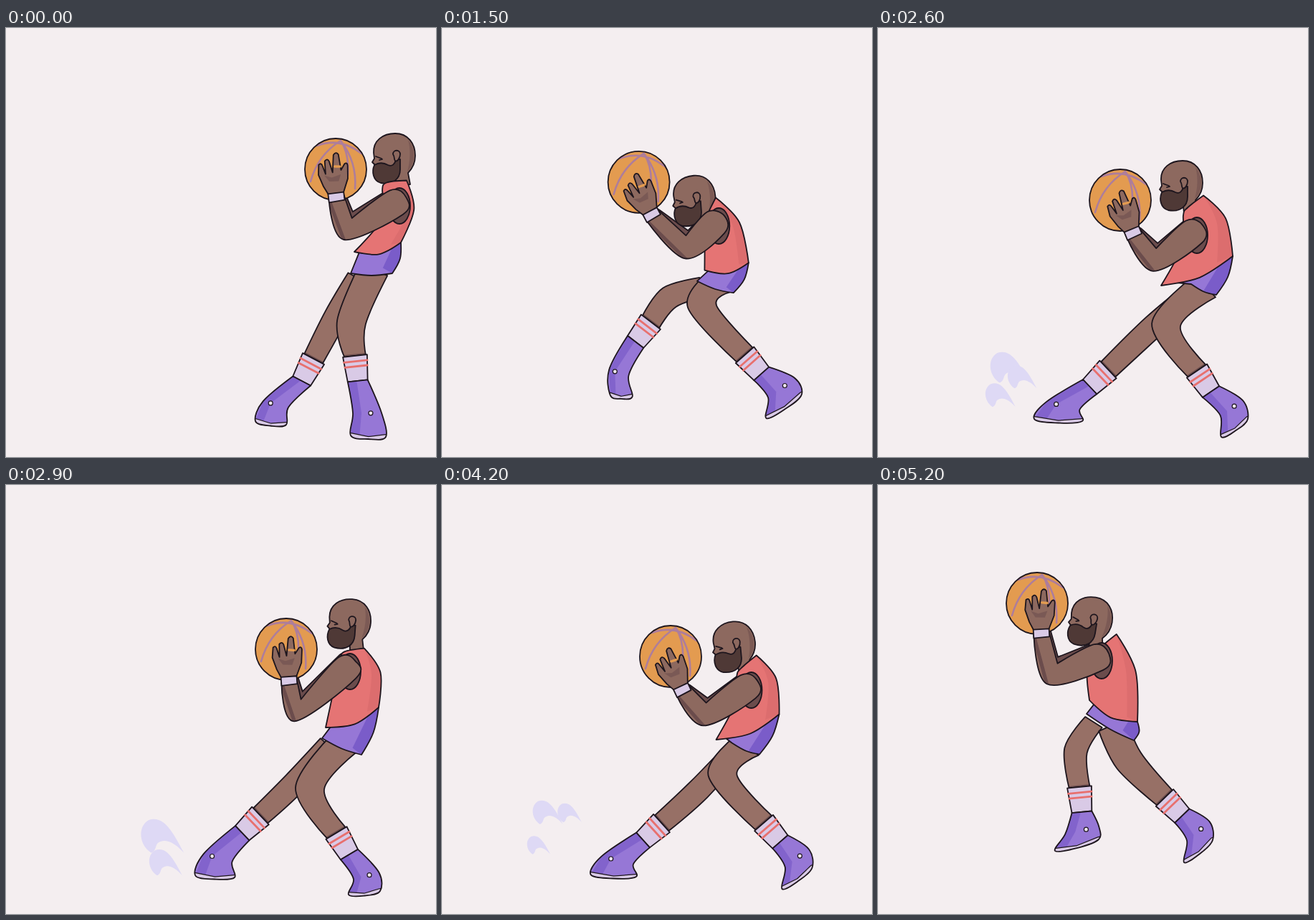
Animation of 600 by 598 pixels, one loop 5500 ms. Source, as an HTML page:

```html
<!DOCTYPE html>
<html lang="en">
<head>
<meta charset="utf-8">
<title>Basketball step-back</title>
<style>
html, body { margin: 0; width: 100%; height: 100%; overflow: hidden; background: #f4eef0; }
svg { display: block; width: 100vw; height: 100vh; }
.ink { stroke: #1d151d; stroke-width: 1.8; stroke-linejoin: round; stroke-linecap: round; }
.line { fill: none; stroke-linejoin: round; stroke-linecap: round; }
</style>
</head>
<body>
<svg id="stage" viewBox="0 0 600 598"></svg>
<script>
const stage = document.getElementById('stage');

const color = {
  ink: '#1d151d', skin: '#8d695f', leg: '#977066', shade: '#6b4c4c', beard: '#4f3936',
  shirt: '#e57474', shirtDark: '#d5686a', purple: '#9677d6', purpleDark: '#7657c7',
  sock: '#d9cae6', stripe: '#e8706e', ball: '#e39b50', seam: '#ad7d9c', dust: '#ded9f5'
};

// Joints of the key poses along the step-back
// head: x y tilt; arm: shoulder elbow wrist; body: neck, back and front hem, seat, thigh
// far, near: knee, ankle, left and right end of the sole
const poses = [
  { u: 0, ball: '460 197', head: '541 178 0', arm: '545 243 477 280 461 236',
    body: '545 214 551 299 486 312 539 342 481 342',
    far: '460 402 429 461 348 548 391 553', near: '482 410 487 457 481 568 530 570' },
  { u: 4, ball: '391 229', head: '479 190 4', arm: '476 255 407 314 395 273',
    body: '486 230 520 310 446 338 496 376 441 353',
    far: '402 416 355 461 264 544 319 547', near: '424 423 461 485 478 571 522 566' },
  { u: 7, ball: '338 240', head: '423 216 0', arm: '441 284 386 323 356 286',
    body: '443 242 495 318 395 359 472 372 437 357',
    far: '385 415 321 476 218 545 285 548', near: '402 414 445 478 479 570 516 545' },
  { u: 11, ball: '300 238', head: '391 227 -11', arm: '414 278 347 316 315 286',
    body: '413 251 446 321 370 351 414 379 372 362',
    far: '333 433 292 467 197 541 257 544', near: '381 395 453 464 470 556 517 522' },
  { u: 13, ball: '278 218', head: '355 240 -5', arm: '387 273 346 308 297 264',
    body: '379 251 432 327 371 340 410 370 360 355',
    far: '320 376 292 409 234 512 263 515', near: '364 389 424 457 454 545 504 512' },
  { u: 18, ball: '222 165', head: '297 187 9', arm: '308 240 243 263 228 207',
    body: '322 217 362 330 295 300 357 356 291 319',
    far: '276 370 281 421 247 510 308 494', near: '350 384 400 436 427 526 467 495' }
];
for (const p of poses)
  for (const k in p) if (k !== 'u') p[k] = p[k].split(' ').map(Number);

// Drawing step -> place along the poses: out, back, out again, then the jump
const track = [[0, 0], [13, 13], [15, 13.3], [17, 13], [21, 13], [22, 11], [32, 1], [35, 1],
  [36, 4], [38, 6], [39, 6], [46, 13], [48, 13.3], [49, 13.3], [52, 18], [55, 18]];

const puffs = [
  { born: 3, from: [212, 490], to: [75, 424], size: 1.3, ease: 1.6 },
  { born: 3, from: [232, 530], to: [78, 487], size: 1, ease: 1 },
  { born: 5, from: [205, 500], to: [125, 393], size: .9, ease: 1.6 }
];

const lerp = (a, b, w) => a + (b - a) * w;
const mix = (a, b, w) => a.map((v, i) => lerp(v, b[i], w));
const add = (a, d, s = 1) => [a[0] + d[0] * s, a[1] + d[1] * s];
const dir = (a, b) => {
  const x = b[0] - a[0], y = b[1] - a[1], l = Math.hypot(x, y) || 1;
  return [x / l, y / l];
};
const perp = d => [-d[1], d[0]];
const pairs = a => a.reduce((r, v, i) => (i % 2 ? r[r.length - 1].push(v) : r.push([v]), r), []);

const xy = p => p[0].toFixed(1) + ' ' + p[1].toFixed(1);
const poly = pts => 'M' + pts.map(xy).join('L');
const path = (d, fill, more = '') => `<path d="${d}" fill="${fill}" ${more}/>`;
const inked = (d, fill) => path(d, fill, 'class="ink"');
const line = (d, stroke, width) => `<path d="${d}" class="line" stroke="${stroke}" stroke-width="${width}"/>`;
const place = (p, angle, inner) => `<g transform="translate(${xy(p)}) rotate(${angle.toFixed(1)})">${inner}</g>`;

function span(keys, t, at) {
  let i = 0;
  while (i < keys.length - 2 && t >= at(keys[i + 1])) i++;
  const a = keys[i], b = keys[i + 1];
  return [a, b, (t - at(a)) / (at(b) - at(a))];
}

function poseAt(u) {
  const [a, b, w] = span(poses, u, p => p.u), out = {};
  for (const k in a) if (k !== 'u') out[k] = pairs(mix(a[k], b[k], w));
  return out;
}

// Closed curve through the points; kinds marks corners (c) and smooth points (s)
function outline(pts, kinds) {
  const n = pts.length, at = i => pts[(i + n) % n];
  const handle = (i, s) => kinds[(i + n) % n] === 'c' ? at(i)
    : at(i).map((v, k) => v + s * (at(i + 1)[k] - at(i - 1)[k]) / 6);
  let d = 'M' + xy(pts[0]);
  for (let i = 0; i < n; i++) d += `C${xy(handle(i, 1))} ${xy(handle(i + 1, -1))} ${xy(at(i + 1))}`;
  return d + 'Z';
}

// Both sides of a bent limb, down one side and up the other
function limb([a, b, c], [wa, wb, wc]) {
  const n1 = perp(dir(a, b)), n2 = perp(dir(b, c)), nb = dir([0, 0], add(n1, n2));
  return [add(a, n1, wa), add(b, nb, wb), add(c, n2, wc),
    add(c, n2, -wc), add(b, nb, -wb), add(a, n1, -wa)];
}

function shaded(id, d, fill, inner) {
  return `<clipPath id="${id}"><path d="${d}"/></clipPath>` + path(d, fill) +
    `<g clip-path="url(#${id})">${inner}</g>` + inked(d, 'none');
}

function leg(id, hip, [knee, ankle, left, right], widths) {
  const thigh = limb([hip, knee, ankle], widths);
  const down = dir(knee, ankle), across = perp(down), foot = add(ankle, down, 35);
  const tl = add(ankle, across, 17), tr = add(ankle, across, -17);
  const a = add(foot, across, 14), b = add(foot, across, -14);
  const stripe = w => line(poly([mix(tl, a, w), mix(tr, b, w)]), color.stripe, 2.8);

  const along = dir(left, right), bend = 12 * Math.tanh(4 * down[0]);
  const inL = add(mix(a, left, .58), along, bend), inR = add(mix(b, right, .58), along, bend);
  const base = add(mix(left, right, .5), perp(along), 4);
  const sole = poly([left, base, right]);
  const shoe = outline([a, inL, left, base, right, inR, b], 'csssssc');
  const dark = poly([a, inL, left, mix(left, right, .25), mix(inL, inR, .3), mix(a, b, .45)]) + 'Z';
  const eye = mix(inL, inR, bend < 0 ? .3 : .62);

  return shaded(id + 'Leg', outline(thigh, 'csccsc'), color.leg,
      line(poly([thigh[2], thigh[3]]), color.shade, 5)) +
    inked(poly([tl, tr, b, a]) + 'Z', color.sock) + stripe(.22) + stripe(.42) +
    shaded(id + 'Shoe', shoe, color.purple, path(dark, color.purpleDark, 'opacity=".6"') +
      line(sole, color.ink, 8) + line(sole, color.sock, 5.5)) +
    `<circle cx="${eye[0].toFixed(1)}" cy="${eye[1].toFixed(1)}" r="3" fill="#eee6f0" class="ink" style="stroke-width:1.2"/>`;
}

function shirt(head, shoulder, [neck, hemB, hemF]) {
  const side = perp(dir(neck, head));
  const front = add(neck, side, -14), rear = add(neck, side, 14);
  const back = add(mix(rear, hemB, .45), perp(dir(rear, hemB)), -14);
  const hem = add(mix(hemB, hemF, .5), perp(dir(hemF, hemB)), 10);
  const chest = add(shoulder, [-16, 18]), strap = add(front, [-6, 11]);
  const fold = [rear, add(back, [9, 0]), hemB, mix(hemB, hemF, .22), mix(back, chest, .2)];
  return shaded('shirt', outline([front, rear, back, hemB, hem, hemF, chest, strap], 'scscscss'),
    color.shirt, path(outline(fold, 'csccs'), color.shirtDark, 'opacity=".55"'));
}

function shorts([, hemB, hemF, seat, thigh]) {
  const rump = add(mix(hemB, seat, .5), perp(dir(hemB, seat)), -5);
  const pts = [mix(hemF, hemB, .12), hemB, rump, seat, add(mix(thigh, seat, .5), [0, 3]), thigh];
  const fold = [hemB, add(rump, [8, 0]), seat, mix(seat, hemF, .25), mix(hemB, hemF, .15)];
  return shaded('shorts', outline(pts, 'ccscsc'), color.purple,
    path(poly(fold) + 'Z', color.purpleDark, 'opacity=".85"'));
}

function arm([shoulder, elbow, wrist]) {
  const cap = add(shoulder, dir(elbow, shoulder), 15);
  const pts = [...limb([shoulder, elbow, wrist], [19, 16, 11]), cap];
  return `<ellipse cx="${shoulder[0] + 4}" cy="${shoulder[1] + 5}" rx="15" ry="25" fill="${color.shade}" class="ink"/>` +
    shaded('arm', outline(pts, 'scccsss'), color.skin, line(poly(pts.slice(3, 5)), color.shade, 5));
}

function farArm([shoulder, elbow, wrist]) {
  const d = poly([add(shoulder, [-6, -14]), add(elbow, [4, -15]), add(wrist, [7, -2])]);
  return line(d, color.ink, 14) + line(d, color.shade, 10.5);
}

const ballArt = `<circle r="43" fill="${color.ball}"/>` +
  line('M7-40Q-25-20-35 17M7-40Q30-10 27 27M7-40Q19-22 17 8M-26-33Q6-45 36-22', color.seam, 2.6) +
  '<circle r="43" fill="none" class="ink"/>';

const headArt =
  inked('M-28-4C-29-21-15-31 2-31C20-31 30-17 30 0C30 12 25 19 20 24L23 40L4 42L2 24L-23 24L-26 13L-30 9L-27 4Z', color.skin) +
  path('M20-22C32-8 30 12 19 22C23 8 24-8 20-22Z', color.shade, 'opacity=".5"') +
  inked('M-27 13C-31 22-29 35-18 38C-2 41 9 33 9 19L9 5L3 5C2 11-2 16-8 13C-15 9-22 10-27 13Z', color.beard) +
  inked('M-1-2C-1-9 9-9 9-2C9 3 5 9 2 7C0 6 2 2-1-2Z', color.skin) +
  line('M-25 1L-17 4M-20 6L-16 5', color.ink, 1.8);

const handArt =
  inked('M-10-4L-16-17L-21-34L-19-48Q-15-51-14-46L-11-34L-10-52Q-6-56-4-51L-1-35L3-59Q7-64 10-59L11-37L17-45Q21-47 21-42L19-24L10-4Z', color.skin) +
  path('M-13-32L-3-28L10-31L6-22L-7-23Z', color.shade, 'opacity=".55"') +
  line('M3-43L10-42', color.ball, 3.4) +
  inked('M-11-6L11-6L11 5L-11 6Z', color.sock);

const puffArt = 'M-4 19C-16 12-20-8-7-16C9-22 19-4 31 19C22 9 13 4 6 7C-1 9 3 16-4 19Z';

function figure({ ball, head, arm: joints, body, far, near }) {
  const [, elbow, wrist] = joints, [, , , seat, thigh] = body;
  const d = dir(elbow, wrist);
  const handAngle = .8 * Math.atan2(d[0], -d[1]) * 180 / Math.PI + 9;
  return farArm(joints) + place(ball[0], 0, ballArt) +
    leg('far', add(mix(thigh, seat, .15), [0, 6]), far, [14, 16, 14.5]) +
    leg('near', add(mix(thigh, seat, .55), [0, -5]), near, [21, 20, 15]) +
    shorts(body) + place(head[0], head[1][0], headArt) +
    shirt(head[0], joints[0], body) + arm(joints) + place(wrist, handAngle, handArt);
}

function dust(u) {
  return puffs.map(p => {
    const w = (u - p.born) / (12 - p.born);
    if (w < 0 || w >= 1) return '';
    const at = mix(p.from, p.to, w ** p.ease), size = p.size * (1 - w ** 3);
    return path(puffArt, color.dust, `transform="translate(${xy(at)}) scale(${size.toFixed(3)})"`);
  }).join('');
}

let shown = -1;
function draw(now) {
  const step = Math.floor(now % 5500 / 100);
  if (step === shown) return;
  shown = step;
  const [a, b, w] = span(track, step, k => k[0]), u = lerp(a[1], b[1], w);
  stage.innerHTML = dust(u) + figure(poseAt(u));
}

const start = performance.now();
function tick() {
  draw(performance.now() - start);
  requestAnimationFrame(tick);
}
tick();
</script>
</body>
</html>
```
